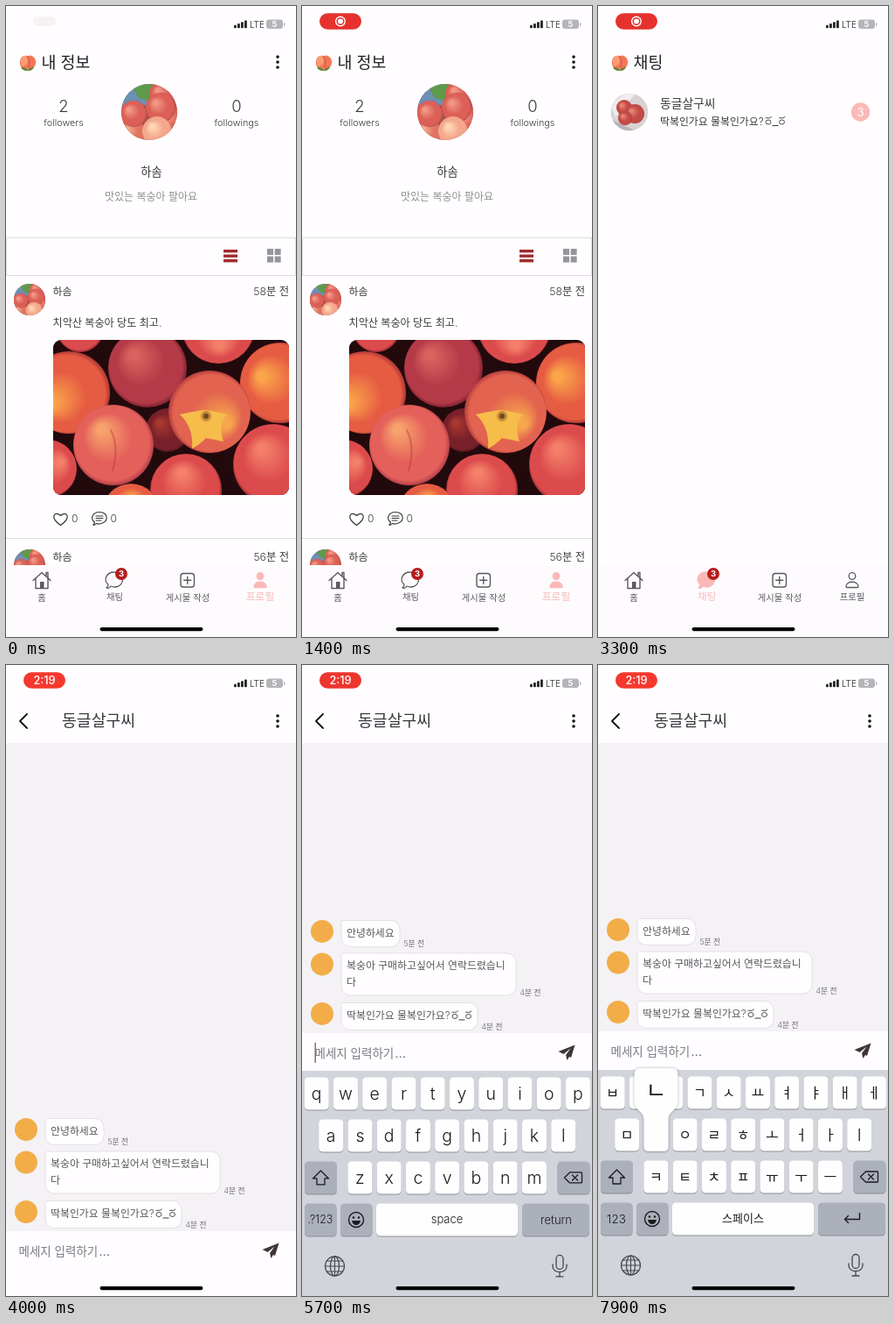
These frames come from a looping animation (332 px wide and 720 px high, 8000 ms). An HTML page with a canvas:

```html
<!DOCTYPE html>
<html lang="ko">
<head>
<meta charset="utf-8">
<title>Peach market</title>
<style>
html, body { margin: 0; width: 332px; height: 720px; overflow: hidden; background: #fffdff; }
canvas { display: block; width: 332px; height: 720px; }
</style>
</head>
<body>
<canvas id="stage"></canvas>
<script>
const W = 332, H = 720, LOOP = 8000, TAU = Math.PI * 2;
const FONT = "Inter, 'Noto Sans CJK KR', 'Noto Sans CJK', sans-serif";
const PAPER = '#fffdff', INK = '#3c3a3d', PINK = '#fab9b8', RED = '#b71c1c';
const ME = '하솜', PEER = '동글살구씨';
const TIME = { tab: 2050, push: 3400, focus: 5250, keys: 5400, lang: 6800, press: 7800 };

const canvas = document.getElementById('stage');
const dpr = window.devicePixelRatio || 1;
canvas.width = W * dpr;
canvas.height = H * dpr;
const c = canvas.getContext('2d');

const clamp = v => Math.max(0, Math.min(1, v));
const span = (t, start, length) => clamp((t - start) / length);
const easeOut = (p, n) => 1 - Math.pow(1 - p, n);

// y is the optical middle of a capital or a Hangul block
function text(str, x, y, size, color = INK, align = 'left', weight = 350) {
  c.font = `${weight} ${size}px ${FONT}`;
  c.textAlign = align;
  c.fillStyle = color;
  c.fillText(str, x, y + size * 0.36);
}
function rect(x, y, w, h, color) {
  c.fillStyle = color;
  c.fillRect(x, y, w, h);
}
function round(x, y, w, h, r, color) {
  c.beginPath();
  c.roundRect(x, y, w, h, r);
  if (color) { c.fillStyle = color; c.fill(); }
}
function disc(x, y, r, color) {
  c.beginPath();
  c.arc(x, y, r, 0, TAU);
  c.fillStyle = color;
  c.fill();
}
function stroke(color, width) {
  c.strokeStyle = color;
  c.lineWidth = width;
  c.stroke();
}
function shape(d, x, y, fill, line, width = 1.4) {
  const path = new Path2D(d);
  c.save();
  c.translate(x, y);
  c.lineJoin = c.lineCap = 'round';
  if (fill) { c.fillStyle = fill; c.fill(path); }
  if (line) { c.strokeStyle = line; c.lineWidth = width; c.stroke(path); }
  c.restore();
}
function layer(dx, dy, draw) {
  c.save();
  c.translate(dx, dy);
  draw();
  c.restore();
}

// ---- pictures ----
// lit from the given angle; the far rim falls into shade
function peach(x, y, r, [light, mid, dark], angle = -2.4) {
  const lx = x + Math.cos(angle) * r * 0.5, ly = y + Math.sin(angle) * r * 0.5;
  const g = c.createRadialGradient(lx, ly, r * 0.1, x, y, r * 1.04);
  g.addColorStop(0, light);
  g.addColorStop(0.55, mid);
  g.addColorStop(0.88, mid);
  g.addColorStop(1, dark);
  disc(x, y, r, g);
}
function photo() {
  const warm = ['#fba54a', '#e65c43', '#9c2a30'];
  const rosy = ['#f4806a', '#dc4b4c', '#8c2032'];
  const deep = ['#d9635f', '#b53a47', '#6c1a2a'];
  c.save();
  round(54, 381, 270, 177, 9);
  c.clip();
  rect(54, 381, 270, 177, '#220a0c');
  peach(85, 368, 27, rosy);
  peach(243, 366, 42, rosy, 1.5);
  peach(185, 484, 25, ['#a8382f', '#78202a', '#3c1016']);
  peach(72, 441, 47, warm, 2.6);
  peach(48, 528, 33, rosy, -0.5);
  peach(314, 430, 46, warm, -2.8);
  peach(206, 552, 41, rosy, -1.8);
  peach(143, 578, 33, warm, -1.5);
  peach(162, 413, 45, deep);
  peach(306, 523, 46, rosy, -2.2);
  peach(123, 501, 46, ['#f7a26c', '#e4605a', '#a33445'], -2.2);
  peach(233, 463, 47, ['#f8a84c', '#e2634f', '#a63038'], 0.6);
  shape('M-30-7Q-12-11-2-12Q8-11 24-7Q13 4 20 24Q8 21 0 20Q-8 28-16 32Q-14 8-30-7Z', 229, 473, '#f6bd4b');
  disc(229, 468, 6, '#c98a38');
  disc(229, 468, 3, '#6b4a20');
  shape('M-2-16Q8 4 0 30', 122, 500, null, 'rgba(170,45,60,.4)', 2);
  c.restore();
}
function portrait(x, y, r) {
  c.save();
  c.beginPath();
  c.arc(x, y, r, 0, TAU);
  c.clip();
  c.translate(x, y);
  c.scale(r / 32, r / 32);
  rect(-32, -32, 64, 64, '#a9564c');
  rect(-32, -32, 30, 24, '#6c8fb4');
  shape('M-20-30L4-32L2-12L-12-16Z', 0, 0, '#5f9a4a');
  const skin = ['#f39a86', '#dc6058', '#a93f48'];
  peach(15, -20, 15, skin);
  peach(26, 9, 16, skin);
  peach(-20, 24, 16, ['#f2ac8c', '#df7360', '#b24a4c']);
  peach(-18, 2, 15, skin);
  peach(13, -5, 17, skin);
  peach(9, 22, 17, ['#ffd9b4', '#f4a78c', '#d87468']);
  c.restore();
}
function peerPhoto(x, y, r) {
  c.save();
  c.beginPath();
  c.arc(x, y, r, 0, TAU);
  c.clip();
  c.translate(x, y);
  rect(-r, -r, 2 * r, 2 * r, '#d8d2d2');
  shape('M-22-8L-4-22L8-22L-16 6Z', 0, 0, '#efecec');
  shape('M-22 8L8 22L-22 22Z', 0, 0, '#b9b2b6');
  const skin = ['#e68874', '#c44a46', '#94303a'];
  peach(-6, -5, 9, skin);
  peach(6, 2, 11, skin);
  peach(-5, 7, 8, skin);
  c.restore();
}
function peachSign(x, y) {
  shape('M-1-8C8-11 12-1 7 5Q4 9 0 9Q-5 9-8 4C-11-3-7-10-1-8Z', x, y, '#f5775a');
  shape('M-2-8C-8-9-9-2-7 3Q-3 4-1 1Q1-4-2-8Z', x, y, '#fb9d72');
  shape('M-1-8Q4-3 1 5', x, y, null, '#cf4f3f', 1);
  shape('M0 9Q-6 9-8 5Q-3 4 0 9ZM0 9Q5 9 7 5Q3 4 0 9Z', x, y, '#5d8a3c');
}
function lookFace(x, y) {
  for (const ox of [4.5, 20]) {
    c.beginPath();
    c.ellipse(x + ox, y + 1.5, 3, 2.5, 0, 0, TAU);
    stroke(INK, 0.9);
    shape('M-3-3.2H1.5Q3-3.4 3.4-4.6', x + ox, y, null, INK, 0.9);
  }
  rect(x + 9, y + 5, 7, 1, INK);
}

// ---- shared chrome ----
function dots() {
  for (const y of [58, 64, 70]) disc(311, y, 1.8, '#111');
}
function statusBar(t) {
  const p = easeOut(span(t, 0, 300), 3);
  const glow = 0.5 - 0.5 * Math.cos((t - 1400) / 1950 * TAU);
  const mix = (a, b) => Math.round(a + (b - a) * p);
  const hot = [230 + 22 * glow, 50 + 8 * glow, 46];
  const color = `rgb(${hot.map((v, i) => mix([246, 244, 246][i], v))})`;
  const w = 26 + 22 * p, h = 11 + 7.5 * p;
  round(44 - w / 2, 17.5 - h / 2, w, h, h / 2, color);
  if (t >= TIME.push) {
    text('2:19', 44, 17.7, 12.8, '#fff', 'center', 500);
  } else {
    c.globalAlpha = p;
    c.beginPath();
    c.arc(44, 17.5, 5.3, 0, TAU);
    stroke('#fff', 1.4);
    disc(44, 17.5, 3, '#fff');
    c.globalAlpha = 1;
  }
  for (let i = 0; i < 4; i++) {
    const bar = 3.5 + i * 1.8;
    round(261 + i * 4, 25.3 - bar, 2.8, bar, 0.8, '#222');
  }
  text('LTE', 279, 21, 9.8, '#444', 'left', 400);
  round(298, 15.5, 19, 10.5, 3.2, '#b6b4b9');
  round(318, 19, 1.4, 4, 0.7, '#b6b4b9');
  text('5', 307.5, 20.8, 9.5, '#fff', 'center', 600);
}
function titleBar(title) {
  peachSign(25, 65);
  text(title, 40.5, 64, 18.4, '#242226');
}
function navBar(t, chat) {
  rect(0, 638, W, 82, '#fefbfe');
  const p = span(t, 1960, 220), fade = 1 - span(t, 2300, 250);
  if (p > 0 && fade > 0) {
    c.save();
    c.beginPath();
    c.rect(0, 638, W, 82);
    c.clip();
    disc(125, 664, 10 + 43 * easeOut(p, 2), `rgba(60,20,40,${0.035 * fade})`);
    c.restore();
  }
  const gray = '#5c595e';
  shape('M-10 0L0-9L10 0M-7-2V9H7V-2M5-5V-9H7V-3', 41, 655.5, null, gray, 1.4);
  rect(39, 657, 4.5, 7.5, gray);
  shape('M0-9C12-9 13 7 1 8Q-2 8-4 7Q-6 10-9 9Q-7 7-7 5C-13 0-9-9 0-9Z', 124, 655,
    chat ? PINK : null, chat ? PINK : gray, 1.3);
  disc(132, 648, 7, RED);
  text('3', 132, 648, 9.5, '#fff', 'center', 700);
  round(200, 647.5, 15.5, 15.5, 3);
  stroke(gray, 1.4);
  shape('M-4 0H4M0-4V4', 207.75, 655.25, null, gray, 1.4);
  const tone = chat ? gray : PINK;
  c.beginPath();
  c.arc(291, 650.5, 3.8, 0, TAU);
  if (!chat) { c.fillStyle = tone; c.fill(); }
  stroke(tone, 1.3);
  shape('M-7 5C-7-2 7-2 7 5Q7 6 6 6H-6Q-7 6-7 5Z', 291, 657.5, chat ? null : tone, tone, 1.3);
  text('홈', 41, 675, 10.3, gray, 'center');
  text('채팅', 124.5, 674, chat ? 11.7 : 10.3, chat ? PINK : gray, 'center');
  text('게시물 작성', 208, 675, 10.3, gray, 'center');
  text('프로필', 291, 674, chat ? 10.3 : 11.7, tone, 'center');
}

// ---- profile page ----
function post(dy, ago) {
  layer(0, dy, () => {
    portrait(27, 335, 18);
    text(ME, 53.5, 325.5, 11.9);
    text(ago, 324, 326, 12.3, INK, 'right');
  });
}
function count(n, label, x) {
  text(n, x, 114, 18.5, INK, 'center');
  text(label, x, 133, 10.8, INK, 'center');
}
function profile() {
  titleBar('내 정보');
  dots();
  count('2', 'followers', 66);
  count('0', 'followings', 264);
  portrait(164, 121, 32);
  text(ME, 166.5, 189, 13.2, INK, 'center');
  text('맛있는 복숭아 팔아요', 166, 218, 12, '#939095', 'center');
  c.beginPath();
  c.rect(0.5, 264.5, 331, 43);
  stroke('#e0dde0', 1);
  for (let i = 0; i < 3; i++) rect(249, 278 + i * 5.5, 16, 3.4, '#a02c30');
  for (let i = 0; i < 4; i++) rect(299 + (i % 2) * 8.6, 277 + (i >> 1) * 8.6, 7, 7, '#97949a');
  post(0, '58분 전');
  text('치악산 복숭아 당도 최고.', 53.5, 362, 12.1);
  photo();
  shape('M0 7C-13-2-7-10 0-4C7-10 13-2 0 7Z', 62.5, 585.5, null, '#333', 1.2);
  text('0', 75, 585, 12);
  shape('M0-7.5C11-7.5 11 5 0 6Q-2 6-3 5.5L-7 7.5L-5.5 4C-11 0-8-7.5 0-7.5ZM-4-3H4M-4-.5H4M-4 2H2', 107, 585, null, '#333', 1.1);
  text('0', 119.5, 585, 12);
  rect(0, 607, W, 1, '#e0dde0');
  post(303, '56분 전');
}
function chatList() {
  titleBar('채팅');
  peerPhoto(36, 121, 21.3);
  text(PEER, 71, 111, 13.8);
  text('딱복인가요 물복인가요?', 71, 131.5, 11.9);
  lookFace(190.5, 131);
  disc(300.5, 121, 10.7, PINK);
  text('3', 300.5, 121, 13, '#fff', 'center', 400);
}

// ---- chat room ----
function bubble(y, w, h, lines, ago) {
  disc(23, y + 13, 13, '#f2ad49');
  round(45, y + 0.5, w, h, [2, 10, 10, 10], PAPER);
  stroke('#e4e1e5', 1);
  lines.forEach((s, i) => text(s, 51, y + 14.5 + i * 18.5, 11.9, '#5a575c'));
  text(ago, 45 + w + 4.5, y + h - 3, 8.7, '#6d6a70');
}
function room(t) {
  const lift = 228 * easeOut(span(t, TIME.keys + 22, 400), 4);
  rect(0, 0, W, H, PAPER);
  rect(0, 89, W, 557, '#f4f2f5');
  shape('M4-8L-4 0L4 8', 20, 64, null, '#111', 1.8);
  text(PEER, 64, 63, 18.3, '#3a383c');
  dots();
  layer(0, -lift, () => {
    bubble(517, 67, 30, ['안녕하세요'], '5분 전');
    bubble(554.5, 200, 48, ['복숭아 구매하고싶어서 연락드렸습니', '다'], '4분 전');
    bubble(611, 156, 31, ['딱복인가요 물복인가요?'], '4분 전');
    lookFace(170.5, 625.5);
    rect(0, 646, W, 300, PAPER);
    text('메세지 입력하기', 14.5, 669, 13.5, '#7d7a80');
    for (const x of [108.5, 112.7, 116.9]) disc(x, 673.3, 0.95, '#7d7a80');
    const since = t - TIME.focus;
    if (since >= 0 && since % 1000 < 500) rect(14.5, 657, 1.5, 23, '#8d6a60');
    shape('M9.5-8.5L-9.5-1L-3.5 2L4.5-4.5L-1 3L.5 9L3 5L5 6Z', 303, 668, '#3f3638');
  });
  if (t >= TIME.keys) {
    const p = easeOut(span(t, TIME.keys, 400), 4);
    layer(0, 258 * (1 - p), () => keyboard(t));
  }
}

// ---- keyboard ----
const LATIN = ['qwertyuiop', 'asdfghjkl', 'zxcvbnm'];
const HANGUL = ['ㅂㅈㄷㄱㅅㅛㅕㅑㅐㅔ', 'ㅁㄴㅇㄹㅎㅗㅓㅏㅣ', 'ㅋㅌㅊㅍㅠㅜㅡ'];
const ROW_X = [16.7, 33.2, 66.4];

function key(x, y, w, color = '#fffeff') {
  round(x, y - 17.5, w, 37, 4.5, '#8e9097');
  round(x, y - 18.5, w, 37, 4.5, color);
}
function keyboard(t) {
  const korean = t >= TIME.lang, dark = '#abb0bb', ink = '#1c1b1e';
  rect(0, 462, W, 260, '#d2d4db');
  (korean ? HANGUL : LATIN).forEach((row, r) => {
    [...row].forEach((ch, i) => {
      const x = ROW_X[r] + i * 33.25, y = 488 + r * 48;
      key(x - 14, y, 28);
      text(ch, x, y, korean ? 16 : 19.5, ink, 'center', korean ? 350 : 300);
    });
  });
  key(3, 584, 37, dark);
  shape('M0-8L9 1H4.5V8H-4.5V1H-9Z', 21.5, 584, null, ink, 1.3);
  key(292.5, 584, 37, dark);
  shape('M-4-6H9Q10-6 10-5V5Q10 6 9 6H-4L-10 0ZM-1-3L5 3M5-3L-1 3', 310.5, 584, null, ink, 1.3);
  key(3, 632, 36.5, dark);
  text(korean ? '123' : '.?123', 21, 632, korean ? 13.5 : 12.5, ink, 'center');
  key(44, 632, 36.5, dark);
  c.beginPath();
  c.arc(62, 632, 8.5, 0, TAU);
  stroke(ink, 1.4);
  disc(59, 629.5, 1.3, ink);
  disc(65, 629.5, 1.3, ink);
  shape('M-5 1H5Q4 6 0 6Q-4 6-5 1Z', 62, 632, ink);
  key(85, 632, 162);
  text(korean ? '스페이스' : 'space', 166, 631, 13, ink, 'center');
  key(252, 632, 77, dark);
  if (korean) shape('M9-6V1H-8M-4-3L-8 1L-4 5', 290.5, 631.5, null, ink, 1.4);
  else text('return', 291, 632, 13, ink, 'center');

  const soft = '#45474d';
  for (const rx of [11, 5]) {
    c.beginPath();
    c.ellipse(37.5, 685, rx, 11, 0, 0, TAU);
    stroke(soft, 1.2);
  }
  shape('M-11 0H11M0-11V11M-9-6H9M-9 6H9', 37.5, 685, null, soft, 1.1);
  round(291, 672.5, 8, 16, 4);
  stroke(soft, 1.3);
  shape('M-8-2V0C-8 9 8 9 8 0V-2M0 7V12M-4 12H4', 295, 685, null, soft, 1.3);

  if (t >= TIME.press) {
    c.save();
    c.shadowColor = 'rgba(40,42,50,.4)';
    c.shadowBlur = 3 * dpr;
    shape('M-18-76H18Q25-76 25-69V-38C25-28 14-27 14-17V14Q14 19 9 19H-9Q-14 19-14 14V-17C-14-27-25-28-25-38V-69Q-25-76-18-76Z', 66.5, 536, '#fffeff');
    c.restore();
    text('ㄴ', 66.5, 486, 26, ink, 'center');
  }
}

function draw(t) {
  c.setTransform(dpr, 0, 0, dpr, 0, 0);
  rect(0, 0, W, H, PAPER);
  const slide = easeOut(span(t, TIME.push, 450), 3);
  const chat = t >= TIME.tab;
  if (slide < 1) {
    layer(-W / 3 * slide, 0, () => {
      (chat ? chatList : profile)();
      navBar(t, chat);
    });
  }
  if (slide > 0) layer(W * (1 - slide), 0, () => room(t));
  statusBar(t);
  round(107.5, 709, 118, 4.2, 2.1, '#000');
}

const begin = performance.now();
function tick() {
  draw((performance.now() - begin) % LOOP);
  requestAnimationFrame(tick);
}
tick();
</script>
</body>
</html>
```
